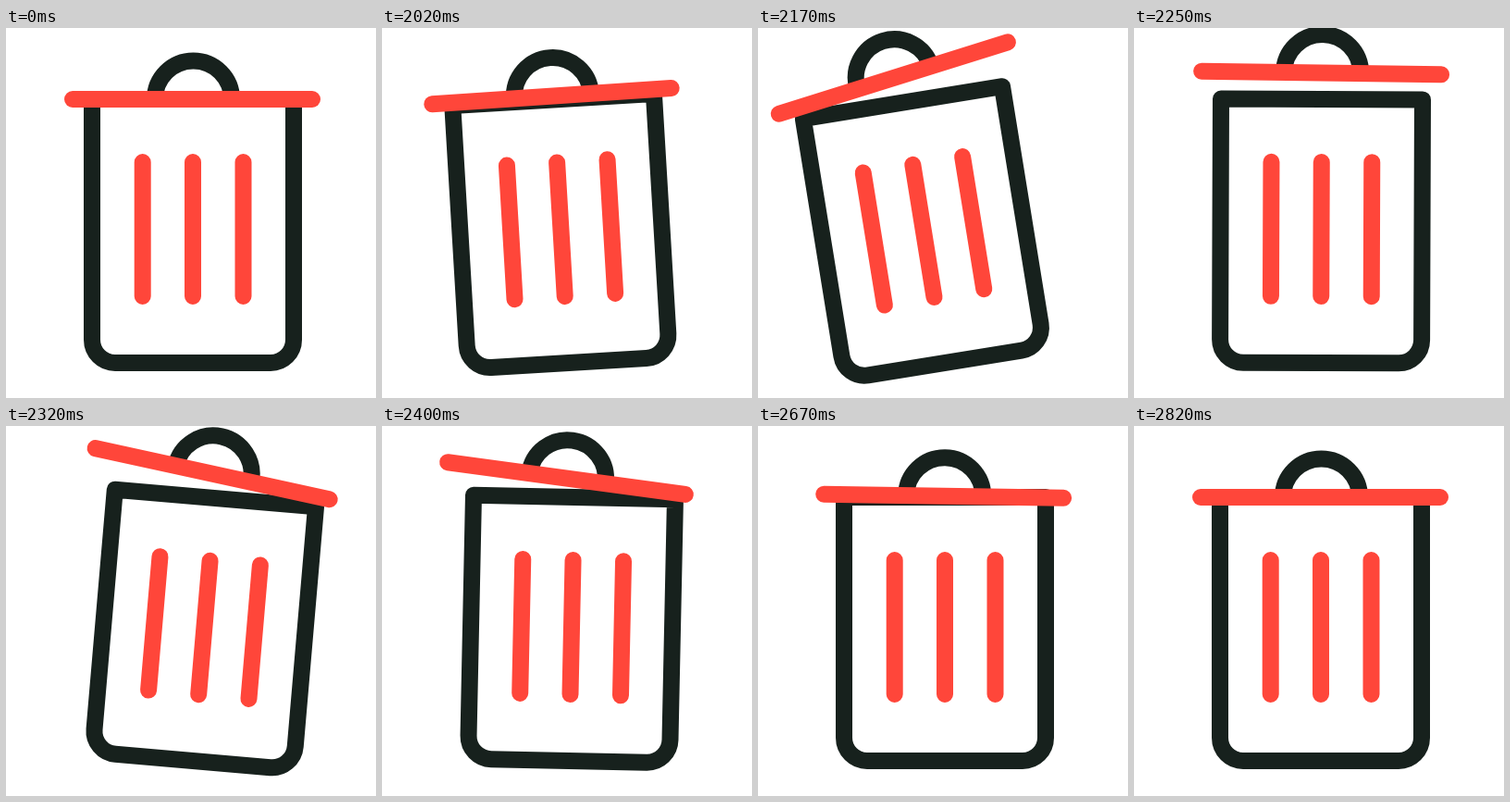
These frames come from a looping animation (400 px wide and 400 px high, 2850 ms). An HTML page:

```html
<!DOCTYPE html>
<html lang="en">
<head>
<meta charset="utf-8">
<title>Bin shake</title>
<style>
  html, body { margin: 0; height: 100%; overflow: hidden; background: #fff; }
  svg { display: block; width: 100%; height: 100%; fill: none; stroke-width: 18; stroke-linejoin: round; }
  .dark { stroke: #17211d; }
  .red { stroke: #ff463a; stroke-linecap: round; }
</style>
</head>
<body>
<svg viewBox="0 0 400 400">
  <g id="bin">
    <path class="dark" d="M93 77H311V337a25 25 0 0 1-25 25H118a25 25 0 0 1-25-25Z"/>
    <path class="red" d="M147.7 145V290M202 145V290M256.5 145V290"/>
    <g id="lid">
      <path class="dark" d="M161 77a41.5 41.5 0 0 1 83 0"/>
      <path class="red" d="M72 77H331"/>
    </g>
  </g>
</svg>
<script>
const LOOP = 2850, START = 2020;
const bin = document.getElementById('bin');
const lid = document.getElementById('lid');

// Keys are [step, value]; one step is 25 ms after START.
const tilt = [[0, -3.4], [2, -8], [4, -9.7], [6, -9.2], [9, 0.2], [11.5, 5], [15, 1.2], [17.5, -1], [20, 0]];
const lidTurn = [[0, -0.4], [2, -3.8], [4, -7.2], [6, -8.2], [9, 0.6], [12.5, 8], [15, 6.5], [18.5, -3], [21, -0.3], [24, 2.2], [28, -0.7], [31, 0]];
const lidX = [[0, -0.9], [4, -3.8], [6, -5.2], [9, 0], [12, -5], [15, -8.4], [21, -3], [26, -0.8], [31, 0]];
const lidY = [[0, -4], [2, -15], [4, -25], [6, -27.9], [9, -28.5], [12, -26], [15, -20.3], [21, -5.5], [24, -2.5], [28, -0.5], [31, 0]];

// Smooth curve through the keys, flat at both ends.
function sample(keys, k) {
  const last = keys.length - 1;
  if (k >= keys[last][0]) return keys[last][1];
  const i = keys.findIndex(key => key[0] > k) - 1;
  const slope = j => j <= 0 || j >= last ? 0
    : (keys[j + 1][1] - keys[j - 1][1]) / (keys[j + 1][0] - keys[j - 1][0]);
  const [k0, v0] = keys[i], [k1, v1] = keys[i + 1];
  const d = k1 - k0, u = (k - k0) / d, w = 1 - u;
  return v0 * w * w * (1 + 2 * u) + v1 * u * u * (3 - 2 * u)
    + d * u * w * (slope(i) * w - slope(i + 1) * u);
}

function draw(now) {
  const t = now % LOOP;
  // Steps fall on whole hundredths of a second.
  const step = Math.floor(Math.floor((t - START) / 10) / 2.5);
  const at = keys => step < 0 ? 0 : sample(keys, step);
  bin.setAttribute('transform', `rotate(${at(tilt)} 202 362)`);
  lid.setAttribute('transform', `translate(${at(lidX)} ${at(lidY)}) rotate(${at(lidTurn)} 201.5 77)`);
  requestAnimationFrame(() => draw(performance.now() - begin));
}

const begin = performance.now();
draw(0);
</script>
</body>
</html>
```
